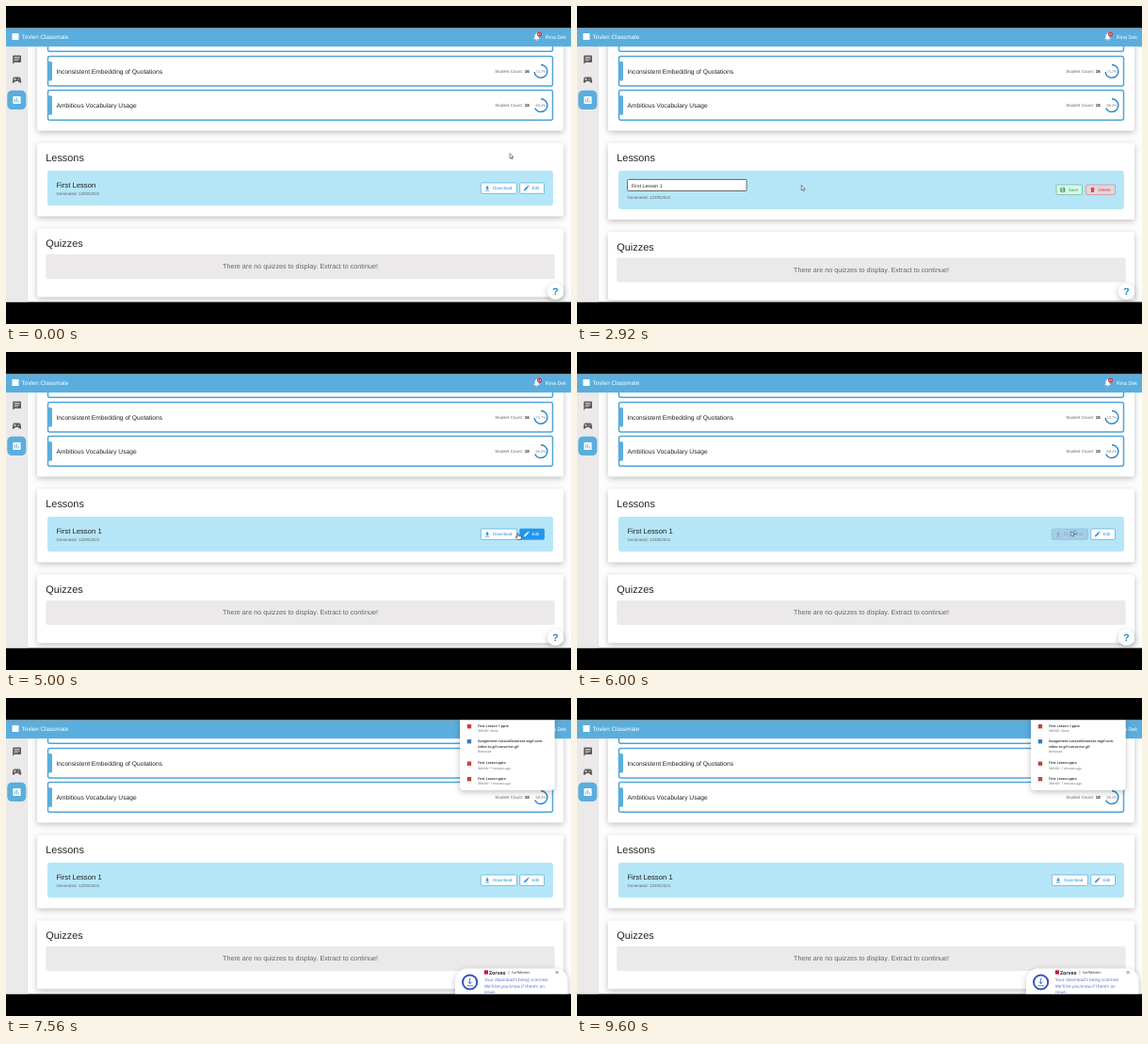
Write an HTML page that moves like this. It is 600 px wide and 338 px high and loops after 9640 ms.

```html
<!DOCTYPE html>
<html lang="en">
<head>
<meta charset="utf-8">
<title>Lesson editing</title>
<style>
  html, body { margin: 0; width: 100%; height: 100%; overflow: hidden; background: #000; }
  svg { display: block; width: 100vw; height: 100vh; }
  text { font-family: "Liberation Sans", Arial, sans-serif; fill: #222; white-space: pre; text-rendering: geometricPrecision; }
  .card { fill: #fff; filter: drop-shadow(0 2px 3px rgba(0,0,0,.24)); }
  .row { fill: #fff; stroke: #4fa5d8; stroke-width: 1.5; }
  .accent { fill: #5aaedd; }
  .h { font-size: 10.9px; }
  .item { font-size: 6.67px; }
  .small { font-size: 4.45px; fill: #666; }
  .strong { font-weight: bold; fill: #222; }
  .pct { font-size: 3.9px; fill: #777; text-anchor: middle; }
  .arc { fill: none; stroke: #2b86c5; stroke-width: 1.4; }
  .btn text { font-size: 4.6px; }
  .btn rect { stroke-width: .7; }
  .ui text { font-family: "Open Sans", "Noto Sans", sans-serif; }
  .file { font-size: 3.65px; font-weight: 600; }
  .ui .meta { font-size: 3.25px; fill: #555; }
  .ui .note { font-size: 4.55px; fill: #4a66c4; }
</style>
</head>
<body>
<svg viewBox="0 0 600 338" preserveAspectRatio="none">
  <defs>
    <clipPath id="page"><rect y="23.5" width="600" height="291"/></clipPath>
    <clipPath id="main"><rect x="22" y="43" width="578" height="272"/></clipPath>
    <path id="download" d="M-.8-2.4h1.6v1.9h1.3L0 1.5-2.1-.5h1.3zM-2.1 2h4.2v.8h-4.2z"/>
    <path id="pencil" d="M-2.5 1.3 1-2.2 2.2-1-1.3 2.5H-2.5zM1.4-2.6l.5-.4q.3-.2.6 0l.5.5q.3.3 0 .6l-.4.5z"/>
    <path id="floppy" fill-rule="evenodd" d="M-2.5-2.5h4L2.5-1.5v4h-5zM-1.8-1.8v1.3h2.8v-1.3zM-1.1.5v1.3h2.2V.5z"/>
    <path id="trash" d="M-2.1-2.2h1.3l.4-.5h.8l.4.5h1.3v.6h-4.2zM-1.8-1.2h3.6L1.5 2.7h-3z"/>
  </defs>
  <rect width="600" height="338"/>
  <g clip-path="url(#page)">
    <rect y="23" width="600" height="292" fill="#fdfdfd"/>

    <g clip-path="url(#main)">
      <rect class="card" x="33" y="30" width="559" height="102.5" rx="2"/>
      <rect class="row" x="44.5" y="20" width="536" height="28.3" rx="2"/>
      <g id="rows"></g>

      <rect class="card" id="lessonCard" x="33" y="145.5" width="559" height="78" rx="2"/>
      <text class="h" x="42.3" y="165">Lessons</text>
      <rect id="lessonBox" x="44" y="175" width="537" height="37.3" rx="3" fill="#b5e6f8"/>
      <text id="lessonName" x="53.4" y="192.9" font-size="7.7"></text>
      <g id="field">
        <rect x="53.6" y="184.4" width="126.5" height="12.1" rx="1" fill="#fff" stroke="#444" stroke-width=".8"/>
        <text id="fieldText" x="58" y="192.5" font-size="5.2"></text>
      </g>
      <text id="date" class="small" x="53.5" y="201.4">Generated: 12/09/2024</text>
      <g id="buttons"></g>

      <g id="quizzes">
        <rect class="card" x="33" y="236.5" width="559" height="72.7" rx="2"/>
        <text class="h" x="42.3" y="256">Quizzes</text>
        <rect x="42.3" y="264" width="540.4" height="26" rx="2" fill="#ebe9e9"/>
        <text x="312.5" y="279.4" font-size="7.2" text-anchor="middle" style="fill:#666">There are no quizzes to display. Extract to continue!</text>
      </g>
    </g>

    <rect y="43" width="22.5" height="272" fill="#ebe9e9"/>
    <rect x="22.3" y="43" width=".6" height="272" fill="#d8d8d8"/>
    <g fill="#5c5c5c">
      <path fill-rule="evenodd" d="M8 52.5h7.200q.8 0 .8.800v5.900q0 .8-.8.800H9l-1.800 1.700v-8.400q0-.8.800-.8zM8.800 54v.8h5.600V54zm0 1.700v.8h5.600v-.8zm0 1.700v.8h3.800v-.8z"/>
      <path fill-rule="evenodd" d="M9 75.500h5q1.300 0 1.600 1.400l.6 3.500q.1 1.400-1 1.400-.7 0-1.300-.7l-1-1.100h-2.800l-1 1.100q-.6.700-1.300.7-1.100 0-1-1.400l.6-3.500q.3-1.400 1.600-1.400zm.1 1.200v.8h-.8v.7h.8v.8h.7v-.8h.8v-.7h-.8v-.8zm4.300.1v.8h.8v-.8zm-.9 1.300v.8h.8v-.8z"/>
    </g>
    <rect x="1.300" y="89.800" width="20" height="20.300" rx="5" fill="#5aaedd"/>
    <path fill="#fff" fill-rule="evenodd" d="M8.200 96h6.600q.8 0 .8.800v6.500q0 .8-.8.800H8.200q-.8 0-.8-.8v-6.500q0-.8.800-.8zM9 98.800v3.600h.9v-3.600zm2-1.300v4.900h.9v-4.900zm2 3v1.900h.9v-1.900z"/>

    <rect y="23.5" width="600" height="19.600" fill="#5aaedd"/>
    <rect x="6.500" y="29" width="7" height="7" fill="#fff"/>
    <text x="16.500" y="35" font-size="6.300" style="fill:#fff">Tovlen Classmate</text>
    <path fill="#fff" d="M560.700 35.200v-.6l.8-.8v-2q0-2 1.500-2.400v-.6h1v.6q1.500.4 1.500 2.400v2l.8.8v.6zm2 .5h1.600q-.1.900-.8.900t-.8-.9z"/>
    <circle cx="566.500" cy="30" r="2.500" fill="#d8343c"/>
    <text x="566.500" y="31.100" font-size="3" text-anchor="middle" style="fill:#fff">10</text>
    <text x="595" y="34.500" font-size="5.400" text-anchor="end" style="fill:#fff">Rina Dek</text>

    <circle class="card" cx="583.500" cy="303.300" r="8.700"/>
    <text x="583.500" y="307.200" font-size="10.500" font-weight="bold" text-anchor="middle" style="fill:#2087c9">?</text>
    <rect y="314" width="600" height=".6" fill="#cfe6d2"/>

    <g id="popup" class="ui">
      <rect class="card" x="482" y="16" width="100.700" height="82" rx="4"/>
      <g id="files"></g>
    </g>

    <g id="toast" class="ui">
      <rect class="card" x="477" y="287.500" width="119.500" height="40" rx="13"/>
      <circle cx="492.600" cy="302" r="7.600" fill="#fff" stroke="#3450bd" stroke-width="2"/>
      <path d="M492.600 297.800v6m-2.200-2.200 2.200 2.200 2.200-2.200M489.300 305.800h6.600" fill="none" stroke="#3450bd" stroke-width=".8"/>
      <rect x="507.800" y="289.400" width="4.200" height="4.200" fill="#c8193c"/>
      <text x="513" y="293.500" font-size="5.200" font-weight="bold">Zorvex</text>
      <rect x="533.700" y="289.500" width=".5" height="4.300" fill="#777"/>
      <text x="536.800" y="293.100" font-size="3.700">SurfMinder</text>
      <path d="M583.500 290l3.200 3.200m0-3.200-3.200 3.200" stroke="#444" stroke-width=".6"/>
      <text class="note" x="508" y="301.300">Your download's being scanned.</text>
      <text class="note" x="508" y="307.800">We'll let you know if there's an</text>
      <text class="note" x="508" y="314.300">issue.</text>
    </g>

    <g id="cursor" stroke-linejoin="round">
      <path id="arrow" d="M0 0v5.600l1.300-1.200.9 2 .9-.4-.9-1.900h1.800z" fill="#fff" stroke="#333" stroke-width=".55"/>
      <path id="hand" d="M-.7.400q.6-.7 1.200 0v2.300l2.600.6q.9.300.8 1.200l-.5 2.500H-.4L-2.400 4.200q.2-.9 1.700 0z" fill="#fff" stroke="#222" stroke-width=".6"/>
      <path id="beam" d="M-1.300-3q1 0 1.300.5.300-.5 1.300-.5M0-2.500v5M-1.300 3q1 0 1.300-.5.300.5 1.300.5" fill="none" stroke="#333" stroke-width=".6"/>
      <g id="busy">
        <path d="M-.8 0v4.800l1.100-1 .8 1.700.8-.4-.8-1.600h1.500z" fill="#fff" stroke="#333" stroke-width=".5"/>
        <circle cx="3.500" cy="1" r="1.900" fill="none" stroke="#3f8fd0" stroke-width="1"/>
        <path id="spin" d="M3.500-.9a1.900 1.900 0 0 1 1.900 1.900" fill="none" stroke="#a8d6f2" stroke-width="1"/>
      </g>
    </g>
  </g>
</svg>
<script>
const LOOP = 9640, EDIT = 840, SAVED = 3740, FADE = 250;
const $ = id => document.getElementById(id);
const set = (el, attrs) => { for (const k in attrs) el.setAttribute(k, attrs[k]); };
const show = (el, on) => { el.style.display = on ? "" : "none"; };
const clamp = v => Math.max(0, Math.min(1, v));
const ease = p => p * p * (3 - 2 * p);

$("rows").innerHTML = [
  ["Inconsistent Embedding of Quotations", 53.4, 16, 73.7],
  ["Ambitious Vocabulary Usage", 89.6, 18, 68.2]
].map(([title, y, count, pct]) => `
  <rect class="row" x="44.5" y="${y}" width="536" height="31.700" rx="2"/>
  <rect class="accent" x="44" y="${y + 5.6}" width="5" height="20.500" rx="1.500"/>
  <text class="item" x="53.500" y="${y + 18.5}">${title}</text>
  <text class="small" x="519.300" y="${y + 17.5}">Student Count:</text>
  <text class="small strong" x="550.800" y="${y + 17.5}">${count}</text>
  <circle class="arc" cx="568" cy="${y + 16}" r="6.900" pathLength="100"
    stroke-dasharray="${pct} 100" transform="rotate(-90 568 ${y + 16})"/>
  <text class="pct" x="568" y="${y + 17.1}">${pct}%</text>`).join("");

$("files").innerHTML = [
  [30, "#c9403a", ["First Lesson 1.pptx"], "388 KB • Done"],
  [46, "#3b79bd", ["Assignment-LessonGenerate-ezgif.com-", "video-to-gif-converter.gif"], "Removed"],
  [69.5, "#c9403a", ["First Lesson.pptx"], "388 KB • 7 minutes ago"],
  [86, "#c9403a", ["First Lesson.pptx"], "388 KB • 7 minutes ago"]
].map(([y, color, lines, meta]) => `
  <rect x="489.700" y="${y - 2}" width="4.400" height="4.400" fill="${color}"/>
  ${lines.map((s, i) => `<text class="file" x="501" y="${y + .8 + i * 6.2}">${s}</text>`).join("")}
  <text class="meta" x="501" y="${y + 6 + (lines.length - 1) * 6.2}">${meta}</text>`).join("");

// Button looks: fill, border, label
const PLAIN = ["#ffffff", "#4fa7dc", "#2b93d5"];
const HOVER = ["#2196ee", "#2196ee", "#ffffff"];
const OFF = ["#a5cde5", "#8dbad6", "#82aeca"];
const SAVE = ["#dcf5ea", "#62b98a", "#36a558"];
const GREEN = ["#4cb84f", "#4cb84f", "#ffffff"];
const DELETE = ["#e3d6dd", "#dc8089", "#e0444d"];

const mix = (a, b, p) => "rgb(" + [1, 3, 5].map(i => {
  const u = parseInt(a.substr(i, 2), 16), v = parseInt(b.substr(i, 2), 16);
  return Math.round(u + (v - u) * p);
}) + ")";

function makeButton(looks, view, edit) {
  const g = document.createElementNS("http://www.w3.org/2000/svg", "g");
  g.setAttribute("class", "btn");
  g.innerHTML = '<rect rx="1"/><use/><text></text>';
  $("buttons").append(g);
  const [box, icon, label] = g.children;
  return (t, editing) => {
    const [name, glyph, x, y, w, h] = editing ? edit : view;
    const i = looks.findLastIndex(l => l[0] <= t);
    const to = looks[i][1], from = looks[Math.max(0, i - 1)][1];
    const p = ease(clamp((t - looks[i][0]) / FADE));
    const [fill, stroke, ink] = to.map((c, k) => mix(from[k], c, p));
    set(box, { x, y, width: w, height: h, fill, stroke });
    set(icon, { href: "#" + glyph, transform: `translate(${x + 6.8} ${y + h / 2})`, fill: ink });
    set(label, { x: x + 12.7, y: y + h / 2 + 1.65 });
    label.style.fill = ink;
    label.textContent = name;
  };
}

const buttons = [
  makeButton(
    [[0, PLAIN], [EDIT, SAVE], [3250, GREEN], [SAVED, HOVER], [4230, PLAIN], [5060, HOVER], [5450, OFF], [6950, PLAIN]],
    ["Download", "download", 504.3, 188, 38.2, 11.3],
    ["Save", "floppy", 509, 190, 27.5, 10.6]),
  makeButton(
    [[0, PLAIN], [380, HOVER], [EDIT, DELETE], [SAVED, PLAIN], [4350, HOVER], [5030, PLAIN]],
    ["Edit", "pencil", 545.7, 188, 25.8, 11.3],
    ["Delete", "trash", 540.7, 190, 30.8, 10.6])
];

// Pointer stops: time, x, y
const stops = [
  [0, 535, 156.5], [120, 535, 156.5], [540, 558, 193], [880, 558, 193], [1340, 101.7, 188.3],
  [2640, 101.7, 188.3], [3380, 524.5, 194.8], [4100, 524.5, 194.8], [4500, 556, 193],
  [4900, 556, 193], [5000, 543.5, 192.5], [5200, 524.5, 193.5], [5900, 524.5, 193.5],
  [6800, 552, 118.5], [6850, 552, 118.5], [7050, 560, 12], [LOOP, 560, 12]
];
const kinds = [[0, "arrow"], [380, "hand"], [940, "arrow"], [1260, "beam"], [2760, "arrow"], [3250, "hand"], [5480, "busy"]];
const typed = [[0, ""], [2260, " "], [2420, " 1"]];
const at = (table, t) => table.findLast(r => r[0] <= t)[1];

function movePointer(t) {
  const i = Math.min(stops.findLastIndex(s => s[0] <= t), stops.length - 2);
  const [t0, x0, y0] = stops[i], [t1, x1, y1] = stops[i + 1];
  const p = ease((t - t0) / (t1 - t0));
  set($("cursor"), { transform: `translate(${x0 + (x1 - x0) * p} ${y0 + (y1 - y0) * p})` });
  const kind = at(kinds, t);
  for (const k of ["arrow", "hand", "beam", "busy"]) show($(k), k === kind);
  set($("spin"), { transform: `rotate(${t * .36} 3.5 1)` });
}

function draw(t) {
  const editing = t >= EDIT && t < SAVED;
  const shift = editing ? 3.6 : 0;
  const name = "First Lesson" + at(typed, t);
  show($("field"), editing);
  show($("lessonName"), !editing);
  $("lessonName").textContent = $("fieldText").textContent = name;
  set($("lessonCard"), { height: 78 + shift });
  set($("lessonBox"), { height: 37.3 + shift });
  set($("date"), { y: 201.4 + shift });
  set($("quizzes"), { transform: `translate(0 ${shift})` });
  buttons.forEach(b => b(t, editing));
  movePointer(t);
  $("popup").style.opacity = clamp((t - 6980) / 120);
  const rise = ease(clamp((t - 7240) / 200));
  show($("toast"), rise > 0);
  set($("toast"), { transform: `translate(0 ${(1 - rise) * 30})` });
}

const start = performance.now();
function tick() {
  draw((performance.now() - start) % LOOP);
  requestAnimationFrame(tick);
}
tick();
</script>
</body>
</html>
```
